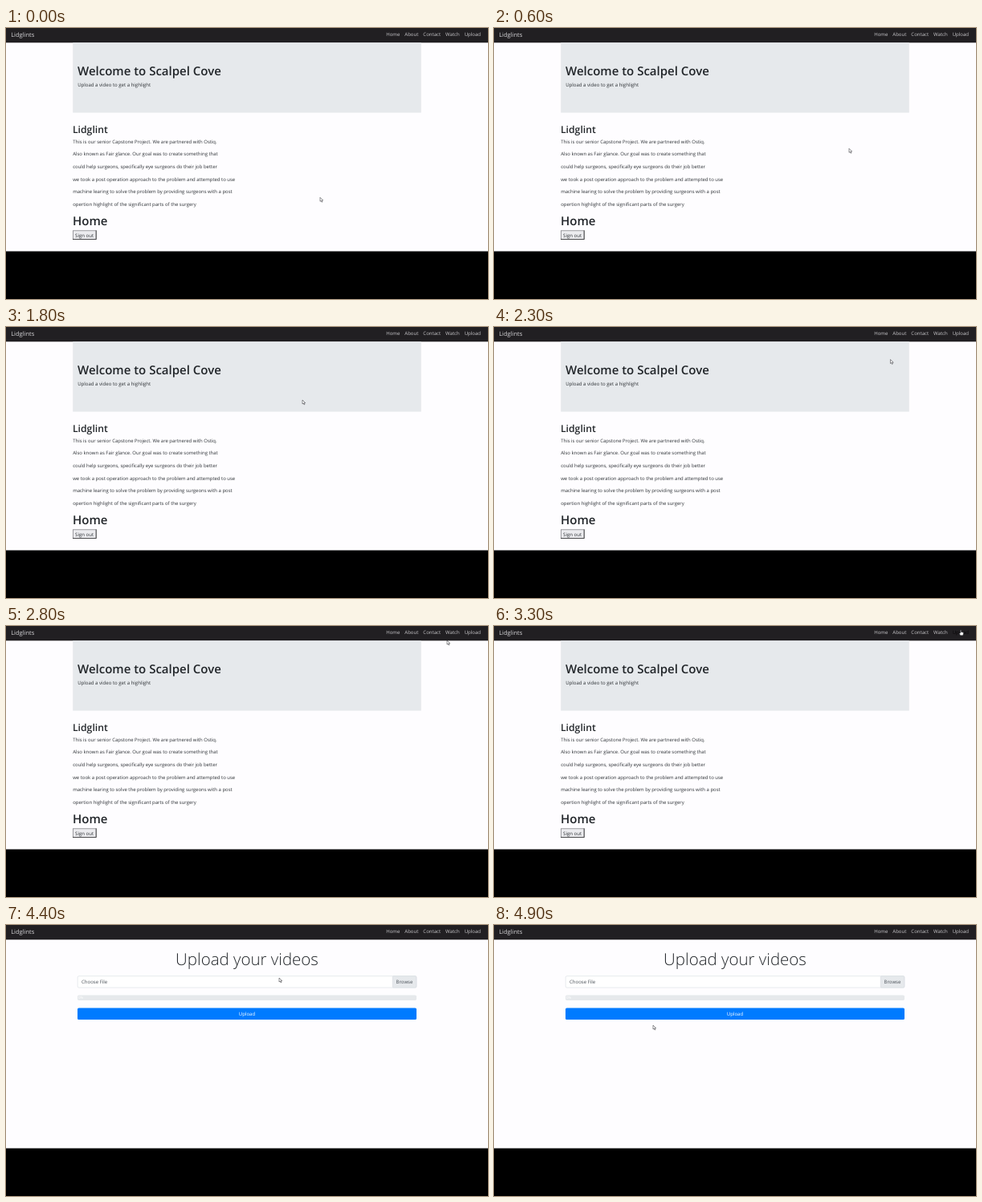
Recreate the animation shown at these times as an HTML page. Size 600 px wide and 338 px high, loop 5000 ms.

```html
<!DOCTYPE html>
<html lang="en">
<head>
<meta charset="utf-8">
<title>Lidglints</title>
<style>
  html, body { margin: 0; width: 100%; height: 100%; overflow: hidden; background: #000; }
  svg { display: block; width: 100%; height: 100%; }
  text {
    font: 6.05px "Open Sans", "Noto Sans", sans-serif;
    fill: #2d3135;
    text-rendering: geometricPrecision;
  }
  .nav text { fill: #c9c8cb; }
  .nav .links { text-anchor: end; }
  .nav .brand { font-size: 7.5px; fill: #d6d5d8; }
  .nav .visited { fill: #070608; }
  .title { font-size: 15px; font-weight: 600; fill: #212529; }
  .subtitle { font-size: 12.2px; font-weight: 600; fill: #212529; }
  .display { font-size: 20.5px; font-weight: 300; fill: #212529; }
  .muted { fill: #495057; }
  .light { fill: #fff; }
  .small { font-size: 4.5px; }
  .middle { text-anchor: middle; }
  .copy text { font-size: 5.97px; }
  .box { fill: #fff; stroke: #ced4da; stroke-width: .5; }
  .gray { fill: #e6e9ec; }
  #cursor path { fill: #fff; stroke: #34343a; stroke-width: .55; stroke-linejoin: round; }
</style>
</head>
<body>
<svg viewBox="0 0 600 338">
  <rect width="600" height="278.5" fill="#fefdff"/>

  <g class="nav">
    <rect width="600" height="18.3" fill="#211f22"/>
    <text class="brand" x="6.2" y="10.7">Lidglints</text>
    <text class="links" x="591" y="9.8">
      <tspan>Home</tspan><tspan dx="6">About</tspan><tspan dx="6">Contact</tspan><tspan
        dx="6">Watch</tspan><tspan dx="6" id="uploadLink">Upload</tspan>
    </text>
  </g>

  <g id="homePage">
    <rect class="gray" x="83.2" y="18.3" width="433.6" height="87.3"/>
    <text class="title" x="89" y="58.8">Welcome to Scalpel Cove</text>
    <text x="89.2" y="72.5">Upload a video to get a highlight</text>
    <text class="subtitle" x="83" y="131">Lidglint</text>
    <g class="copy" id="copy"></g>
    <text class="title" x="83" y="246">Home</text>
    <rect x="83.4" y="252.8" width="28.8" height="10.8" fill="#ececef" stroke="#85858a" stroke-width=".8"/>
    <path d="M83 263.6H112.2V252.4" fill="none" stroke="#333" stroke-width=".8"/>
    <text x="86.1" y="260.5">Sign out</text>
  </g>

  <g id="uploadPage">
    <text class="display middle" x="300" y="49.7">Upload your videos</text>
    <rect class="box" x="89.2" y="63.7" width="421.6" height="14.4" rx="1.6"/>
    <rect class="box gray" x="481.3" y="63.7" width="29.5" height="14.4" rx="1"/>
    <text class="muted" x="94" y="73.2">Choose File</text>
    <text class="muted middle" x="496" y="73.2">Browse</text>
    <rect class="gray" x="89" y="87.6" width="422" height="6.3" rx="1.6"/>
    <text class="light small" x="90" y="92.4">0%</text>
    <rect x="89" y="103.4" width="422" height="14.7" rx="1.6" fill="#007bff"/>
    <text class="light middle" x="300" y="113">Upload</text>
  </g>

  <g id="cursor">
    <path id="arrow" d="M0 0V5L1.2 4 2.1 5.9 2.9 5.5 2.1 3.7H3.7Z"/>
    <path id="hand" d="M-.5 0H.4V2.4L3.3 3V5L2.6 6.7H-.4L-2 4H-.5Z"/>
  </g>
</svg>
<script>
const LOOP = 5000, STEP = 100;
const HOVER_START = 3000, PAGE_CHANGE = 4400;

const paragraph = [
  "This is our senior Capstone Project. We are partnered with Ostiq.",
  "Also known as Fair glance. Our goal was to create something that",
  "could help surgeons, specifically eye surgeons do their job better",
  "we took a post operation approach to the problem and attempted to use",
  "machine learing to solve the problem by providing surgeons with a post",
  "opertion highlight of the significant parts of the surgery"
];

const pointerStart = { x: 391, y: 211.3 };
const moves = [
  { from: 300, to: 900, x: 459, y: 130 },
  { from: 900, to: 1100, x: 463, y: 146 },
  { from: 1500, to: 1800, x: 369, y: 91 },
  { from: 1900, to: 2800, x: 549, y: 18 },
  { from: 2800, to: 3300, x: 581, y: 5 },
  { from: 3600, to: 4200, x: 340, y: 66 },
  { from: 4400, to: 4900, x: 198, y: 125 }
];

const $ = id => document.getElementById(id);
const show = (id, visible) => $(id).style.display = visible ? "" : "none";
const easeOut = k => 1 - (1 - k) ** 2;

paragraph.forEach((line, i) => {
  const text = document.createElementNS($("copy").namespaceURI, "text");
  text.setAttribute("x", 83.2);
  text.setAttribute("y", 143.7 + i * 15.62);
  text.textContent = line;
  $("copy").append(text);
});

function pointerAt(time) {
  let { x, y } = pointerStart;
  for (const move of moves) {
    const progress = (time - move.from) / (move.to - move.from);
    const k = easeOut(Math.min(1, Math.max(0, progress)));
    x += (move.x - x) * k;
    y += (move.y - y) * k;
  }
  return { x, y };
}

function draw() {
  const time = Math.floor(performance.now() % LOOP / STEP) * STEP;
  const { x, y } = pointerAt(time);
  const overLink = x > 568 && y < 15;
  const uploaded = time >= PAGE_CHANGE;

  show("homePage", !uploaded);
  show("uploadPage", uploaded);
  show("arrow", !overLink);
  show("hand", overLink);
  $("uploadLink").classList.toggle("visited", time >= HOVER_START && !uploaded);
  $("cursor").setAttribute("transform", `translate(${x} ${y})`);
  requestAnimationFrame(draw);
}
draw();
</script>
</body>
</html>
```
